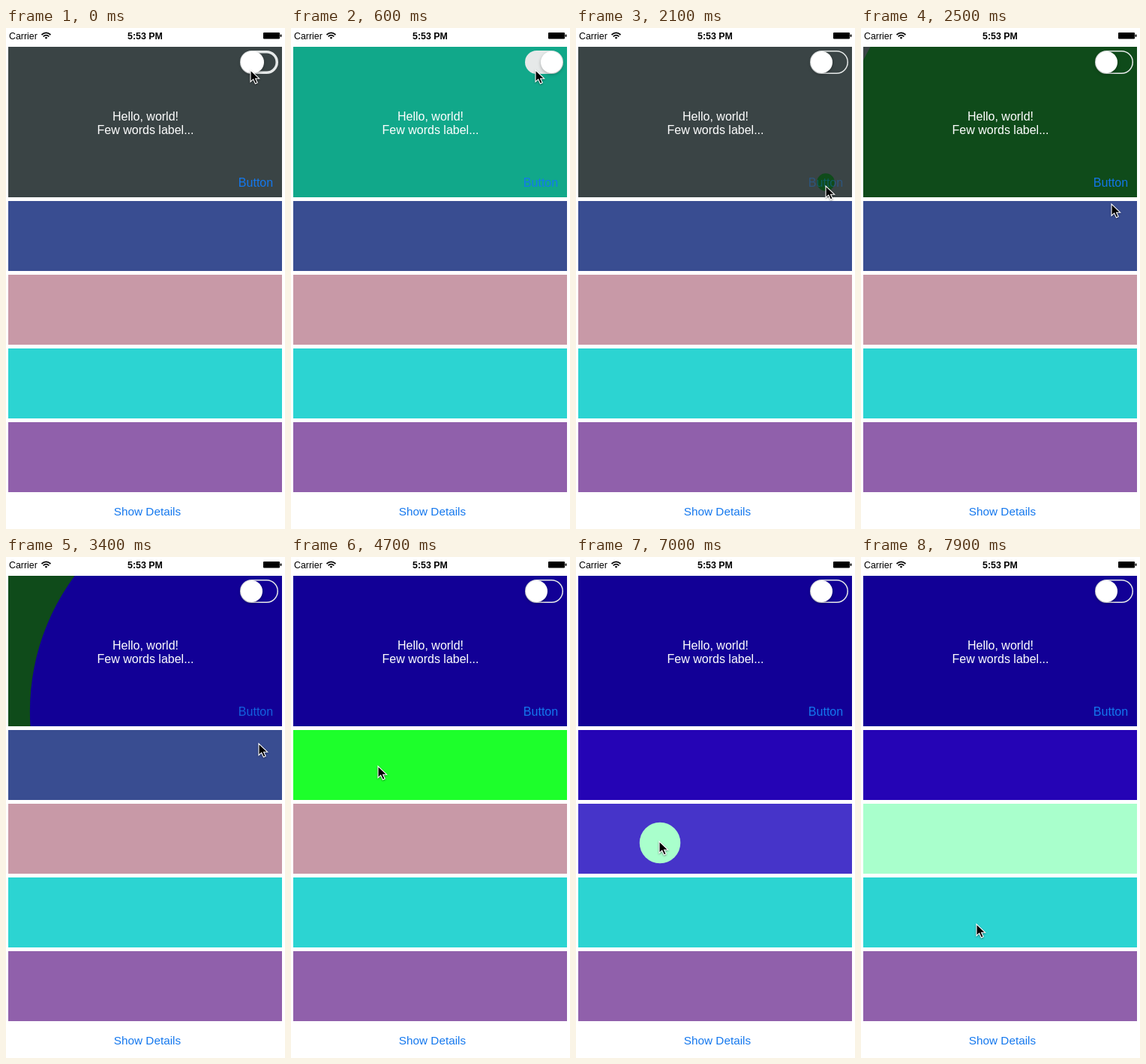
Write an HTML page that moves like this. It is 372x666 px and loops after 8 s.

```html
<!DOCTYPE html>
<html lang="en">
<head>
<meta charset="utf-8">
<title>Ripple colours</title>
<style>
html, body { margin: 0; width: 100%; height: 100%; overflow: hidden; background: #fff; }
#stage { display: block; width: 372px; height: 666px; font: 16px "Liberation Sans", Arial, sans-serif; }
.status { font-size: 12.4px; }
.link { fill: #1478ee; }
.mid { text-anchor: middle; }
#thumb { filter: drop-shadow(0 2px 2px #0004); }
#cursor { filter: drop-shadow(0 1px 1px #0006); }
</style>
</head>
<body>
<svg id="stage" viewBox="0 0 372 666">
  <g id="panels"></g>

  <text class="status" x="4" y="14.7">Carrier</text>
  <g fill="none" stroke="#000" stroke-width="1.7">
    <path d="M47.5 9Q53.5 3.8 59.5 9M49.6 11.3Q53.5 8 57.4 11.3"/>
    <path d="M53.5 14.8L51.6 12.8Q53.5 11.2 55.4 12.8Z" fill="#000" stroke="none"/>
  </g>
  <text class="status mid" x="185.5" y="14.7" font-weight="bold">5:53 PM</text>
  <rect x="343" y="6" width="22" height="8.5" rx="1"/>
  <rect x="365.6" y="8.5" width="1.8" height="3.5" rx=".8"/>

  <g class="mid" fill="#fff">
    <text x="186" y="123">Hello, world!</text>
    <text x="186" y="141">Few words label...</text>
  </g>
  <text id="button" class="link mid" x="333" y="211">Button</text>
  <text class="link mid" x="188.5" y="648" font-size="15.3">Show Details</text>

  <rect id="track" fill="none" stroke="#e6e9e9"/>
  <rect id="thumb" y="31" height="29" rx="14.5" fill="#fff"/>
  <path id="cursor" d="M0 0V15.5L3.7 12.2 6.4 18 9.2 16.8 6.6 11.2H11.6Z" stroke="#fff" stroke-width="1.1"/>
</svg>
<script>
const LOOP = 8000, STEP = 100, GROW = 500;
const $ = id => document.getElementById(id);

// top, height, colour
const panels = [
  [25, 200, '#3a4445'],
  [230, 93, '#394d91'],
  [328, 93, '#c899a7'],
  [426, 93, '#2cd4d2'],
  [524, 93, '#9060ab']
];

// panel, centre, start, colour, time of shrinking back
const ripples = [
  [0, 337, 45, 100, '#11a88a', 1110],
  [0, 333, 205, 2047, '#0f4b1a'],
  [0, 333, 205, 3044, '#120096'],
  [1, 334, 274, 4100, '#1dff2b'],
  [1, 117, 280, 5000, '#2504b5'],
  [2, 334, 389, 5900, '#4634c9'],
  [2, 112, 380, 6900, '#a9ffcc']
];

// time, x, y
const cursorPath = [
  [0, 326, 56], [1100, 326, 56], [1400, 328, 244], [1800, 333, 210], [2100, 333, 210],
  [2500, 334, 234], [2850, 334, 212], [3100, 334, 212], [3400, 337, 248],
  [4000, 334, 273], [4150, 334, 273], [4650, 116, 278], [5050, 116, 278],
  [5800, 333, 387], [6050, 333, 387], [6600, 111, 378], [7000, 111, 378],
  [7700, 114, 472], [7800, 114, 472], [7900, 154, 488]
];

// time, border width, thumb left, thumb width
const switchPath = [
  [0, 3.5, 313, 31], [100, 8, 315, 34], [300, 15.5, 333, 29], [1000, 15.5, 333, 29],
  [1100, 15.5, 328, 34], [1300, 9, 313, 31], [1400, 5.5, 313, 29], [1600, 1.5, 313, 29]
];

const clamp = v => Math.max(0, Math.min(1, v));
const smooth = v => (v = clamp(v)) * v * (3 - 2 * v);

function at(path, t) {
  const i = path.findIndex(k => k[0] > t);
  if (i < 0) return path[path.length - 1].slice(1);
  const a = path[i - 1], b = path[i], p = smooth((t - a[0]) / (b[0] - a[0]));
  return a.slice(1).map((v, n) => v + (b[n + 1] - v) * p);
}

function add(parent, tag, attrs) {
  const el = document.createElementNS('http://www.w3.org/2000/svg', tag);
  set(el, attrs);
  return parent.appendChild(el);
}

function set(el, attrs) {
  for (const name in attrs) el.setAttribute(name, attrs[name]);
}

const boxes = panels.map(([y, height, fill]) => {
  const box = add($('panels'), 'svg', { x: 3, y, width: 365, height, viewBox: `3 ${y} 365 ${height}` });
  add(box, 'rect', { x: 3, y, width: 365, height, fill });
  return box;
});

const circles = ripples.map(([panel, cx, cy, start, fill, back = Infinity]) => {
  const [top, height] = panels[panel];
  const reach = Math.hypot(Math.max(cx - 3, 368 - cx), Math.max(cy - top, top + height - cy)) + 1;
  const el = add(boxes[panel], 'circle', { cx, cy, fill });
  return t => set(el, { r: reach * (smooth((t - start) / GROW) - smooth((t - back) / GROW)) });
});

// The label dims while pressed and fades back after release
function buttonAlpha(t) {
  const click = [2047, 3044].find(c => t > c - 100 && t < c + 470);
  return click ? 0.25 + 0.75 * clamp((t - click) / 470) : 1;
}

function draw(now) {
  const t = Math.floor(now % LOOP / STEP) * STEP;
  circles.forEach(update => update(t));
  const [x, y] = at(cursorPath, t);
  set($('cursor'), { transform: `translate(${x} ${y})` });
  const [b, left, width] = at(switchPath, t);
  set($('track'), {
    x: 312 + b / 2, y: 30 + b / 2, width: 51 - b, height: 31 - b,
    rx: 15.5 - b / 2, 'stroke-width': b
  });
  set($('thumb'), { x: left, width });
  set($('button'), { opacity: buttonAlpha(t) });
}

const begin = performance.now();
(function tick() {
  draw(performance.now() - begin);
  requestAnimationFrame(tick);
})();
</script>
</body>
</html>
```
